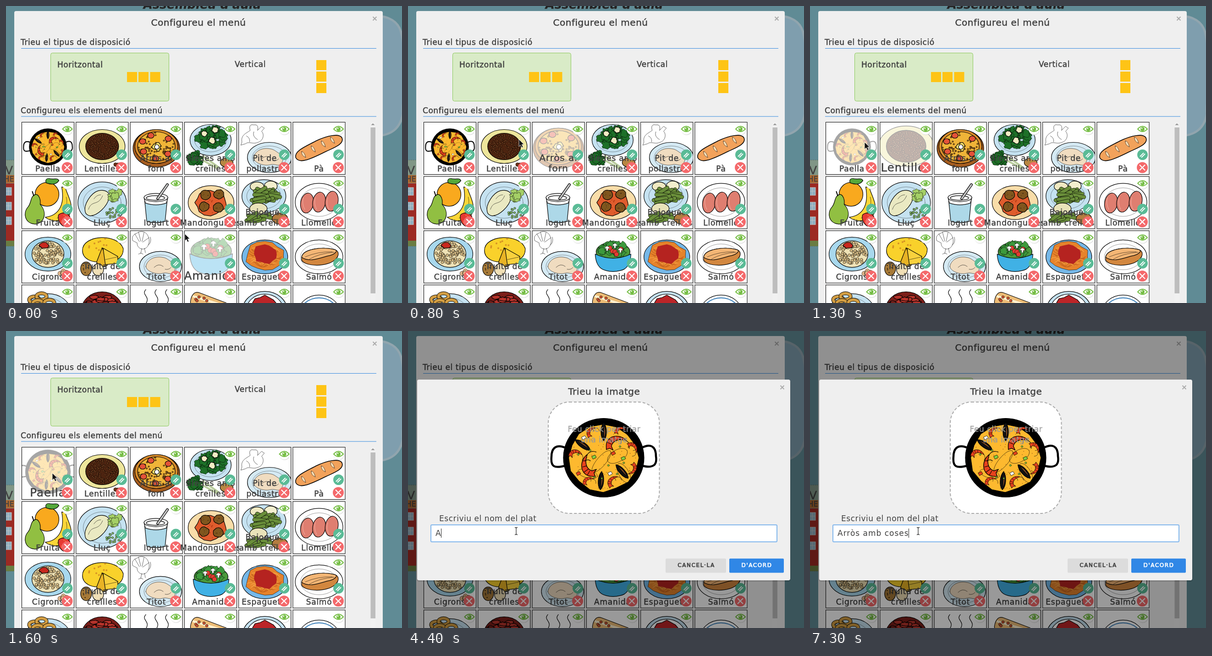
An HTML page for the animation above (8 s loop, 864 by 648 pixels).

```html
<!DOCTYPE html>
<html lang="ca">
<head>
<meta charset="utf-8">
<style>
html, body { margin: 0; width: 100%; height: 100%; overflow: hidden; background: #608b95; }
body > svg { display: block; width: 864px; height: 648px; }
text { font-family: "DejaVu Sans", sans-serif; letter-spacing: .55px; fill: #404040; stroke: #404040; stroke-width: .5px; white-space: pre; }
.label text { letter-spacing: .045em; }
.mid { text-anchor: middle; }
.thin { stroke: none; }
.button { font-size: 12px; letter-spacing: 1.6px; text-anchor: middle; stroke-width: .7px; }
.art { stroke: #000; stroke-width: 1.2; stroke-linejoin: round; stroke-linecap: round; }
.none { stroke: none; }
</style>
</head>
<body>
<script>
const BLUE = '#c5e2f1', ICE = '#d5eaf4', PALE = '#f0dcc0';
let seed = 77;
const rnd = () => (seed = seed * 16807 % 2147483647) / 2147483647;

const rect = (x, y, w, h, fill, more = '') => `<rect x="${x}" y="${y}" width="${w}" height="${h}" fill="${fill}" ${more}/>`;
const oval = (x, y, rx, ry, fill, more = '') => `<ellipse cx="${x}" cy="${y}" rx="${rx}" ry="${ry}" fill="${fill}" ${more}/>`;
const path = (d, fill = 'none', more = '') => `<path d="${d}" fill="${fill}" ${more}/>`;
const text = (x, y, s, size = 17, more = '') => `<text x="${x}" y="${y}" font-size="${size}" ${more}>${s}</text>`;
const group = (transform, body, more = '') => `<g transform="${transform}" ${more}>${body}</g>`;
const thin = 'stroke-width=".6"', bare = 'class="none"';

function blob(x, y, rx, ry, fill, wobble = .3, more = '') {
  const points = Array.from({ length: 16 }, (_, i) => {
    const a = i * Math.PI / 8, r = 1 - wobble * rnd();
    return (x + rx * r * Math.cos(a)).toFixed(1) + ',' + (y + ry * r * Math.sin(a)).toFixed(1);
  });
  return `<polygon points="${points.join(' ')}" fill="${fill}" ${more}/>`;
}
function scatter(n, x, y, rx, ry, draw) {
  let out = '';
  for (let i = 0; i < n; i++) {
    const a = rnd() * 2 * Math.PI, r = Math.sqrt(rnd());
    out += draw(x + rx * r * Math.cos(a), y + ry * r * Math.sin(a), rnd());
  }
  return out;
}
const dots = (n, x, y, rx, ry, r, fill, more = thin) => scatter(n, x, y, rx, ry, (px, py) => oval(px.toFixed(1), py.toFixed(1), r, r, fill, more));

function paella() {
  const mussel = (x, y, rot) => group(`translate(${x} ${y}) rotate(${rot})`,
    path('M0,-20 C8,-10 8,12 0,20 C-8,12 -8,-10 0,-20Z', '#111') + path('M1,-13 C4,-6 4,8 1,13Z', '#a9622f', thin));
  const shrimp = (x, y, rot, s) => group(`translate(${x} ${y}) rotate(${rot}) scale(${s})`,
    path('M-14,8 C-18,-10 4,-17 16,-7 C6,-8 -5,-5 -6,6 L-2,12 L-8,10 L-13,13Z', '#e6421d', 'stroke-width="1"')
    + path('M-14,1 l7,2 M-11,-5 l6,5 M-4,-9 l3,5 M5,-11 l1,4 M16,-7 q8,3 7,12 M6,-8 q4,4 2,8', 'none', 'stroke-width=".8"'));
  const chip = (x, y, fill) => path(`M${x},${y} l7,-3 l3,5 l-7,4Z`, fill, 'stroke-width=".8"');
  return path('M-80,-20 C-102,-31 -114,-23 -114,-2 C-116,20 -108,24 -82,17 M80,-20 C102,-33 114,-25 114,-3 C117,16 108,24 82,17', 'none', 'stroke-width="4.5"')
    + oval(0, 0, 88, 86, '#000') + blob(-1, 0, 78, 76, '#fdb92f', .06)
    + dots(60, 0, 0, 70, 68, .7, '#7a3d10', bare)
    + [[30, -4, 24, 13, -30], [-5, 8, 30, 10, -50], [44, 34, 24, 11, 60], [-35, 35, 22, 9, 15]].map(([x, y, a, b, r]) =>
        oval(x, y, a, b, 'none', `transform="rotate(${r} ${x} ${y})" stroke-width=".6"`)).join('')
    + [[0, -57, 0], [-46, -28, -55], [40, 30, -42], [-6, 50, 4]].map(m => mussel(...m)).join('')
    + [[-32, 18, -75, 1.45], [26, -32, 10, 1.35], [63, -22, 80, .8], [-62, -8, 30, .85], [-34, 51, 5, .75], [20, 52, -20, .85],
       [62, 24, 150, .8], [36, -59, 20, .75], [-27, -56, -20, .75]].map(s => shrimp(...s)).join('')
    + chip(-26, -3, '#85cf3f') + chip(38, 0, '#85cf3f') + chip(16, -11, '#e6421d') + chip(-48, -45, '#fff')
    + chip(9, 33, '#fff') + chip(-60, 33, '#e6421d') + dots(8, 0, 0, 60, 60, 2, '#85cf3f');
}

const plate = (x, y, rx, ry, fill) => oval(x, y, rx, ry, fill) + oval(x, y, rx * .78, ry * .76, 'none', 'stroke-width=".4"');
const breast = (x, y) => group(`translate(${x} ${y})`,
  path('M-32,2 C-29,-14 -12,-21 4,-18 C14,-17 18,-11 26,-7 C36,0 33,9 27,17 C20,20 14,14 4,17 C-8,20 -30,14 -32,2Z', PALE, thin) + path('M-14,4 q10,-10 20,-2 M10,8 q8,2 13,-4', 'none', thin));
const beans = (n, x, y, rx, ry) => scatter(n, x, y, rx, ry, (px, py, k) =>
  group(`translate(${px} ${py}) rotate(${k * 80 - 50})`, rect(-15, -4, 30, 8, '#6a8f3a', 'rx="4" stroke-width=".7"')));
const leaves = (n, x, y, rx, ry, fill) => scatter(n, x, y, rx, ry, (px, py) => blob(px, py, 11, 10, fill, .45, thin));

const foods = [
  ['Paella', group('translate(57 54) scale(.466)', paella())],
  ['Lentilles', oval(57, 53, 50, 37, '#eee69c') + oval(57, 53, 36, 29, '#4d2410') + dots(150, 57, 53, 33, 26, 1.7, '#874a25') + dots(5, 89, 93, 9, 3, 4, '#6a3018')],
  ['Arròs al|forn', oval(57, 57, 51, 41, '#a55d20') + oval(57, 53, 47, 37, '#d78b2b') + oval(57, 53, 41, 32, '#efb438') + dots(70, 57, 53, 40, 31, 1.6, '#9e6420')
    + [[29, 64], [45, 29], [83, 36], [82, 69], [27, 42], [55, 79]].map(([x, y]) => oval(x, y, 7, 6, '#e35238')).join('') + blob(58, 54, 12, 11, '#f8e16c', .5) + oval(58, 54, 5, 5, '#fff')],
  ['Bledes amb|creïlles', plate(57, 39, 45, 34, BLUE) + leaves(32, 57, 32, 30, 21, '#1d7028') + [[43, 25], [67, 17], [60, 40]].map(([x, y]) => blob(x, y, 8, 8, '#f2edc4')).join('')
    + leaves(16, 24, 82, 14, 14, '#1d6d26') + path('M40,74 L74,98 M38,82 L70,100', 'none', 'stroke="#b9cc9c" stroke-width="4"') + oval(92, 88, 14, 10, '#b98742')],
  ['Pit de|pollastre', path('M7,43 C4,28 17,24 25,18 C22,8 26,4 33,6 C42,4 43,12 41,18 L50,9 L56,13 L50,20 C57,27 53,41 42,44 C31,49 22,41 15,47 L5,50Z', '#fff', thin)
    + path('M17,30 q8,4 7,13 M33,21 q-4,10 8,17', 'none', thin) + plate(67, 77, 48, 33, ICE) + breast(64, 76)],
  ['Pà', path('M6,77 C3,62 30,52 50,41 C75,29 101,24 107,34 C113,47 91,55 72,64 C45,77 14,94 6,77Z', '#f2a25b', 'stroke-width="1.6"')
    + [[19, 64], [40, 52], [62, 41], [82, 33]].map(([x, y]) => path(`M${x},${y} q6,0 9,13 q-10,-4 -9,-13Z`, '#f8ddb5', thin)).join('')],
  ['Fruita', oval(55, 39, 26, 26, '#f9a91e') + path('M53,14 C50,6 56,3 62,5 C72,7 77,2 81,9 C74,20 61,17 53,14Z', '#55a83b')
    + path('M87,23 L95,24 C98,38 112,58 107,78 C95,101 65,100 51,89 C78,86 95,65 87,23Z', '#fcd637') + path('M97,45 Q104,72 77,91', 'none', thin)
    + path('M24,43 C34,32 42,47 40,61 C56,78 50,102 29,104 C7,103 1,80 14,66 C20,58 19,49 24,43Z', '#91bf42') + path('M26,42 l-3,-9', 'none', 'stroke-width="2"')
    + path('M80,84 C89,75 107,82 105,91 C104,102 94,109 90,108 C82,103 78,93 80,84Z', '#e73932') + dots(14, 93, 93, 10, 10, .8, '#ffd45c', bare)],
  ['Lluç', plate(57, 57, 53, 45, BLUE) + path('M20,77 C16,62 32,36 49,31 C64,28 75,34 72,47 C68,66 46,86 31,86 C25,85 21,82 20,77Z', '#eae9c2') + path('M27,72 C34,50 48,66 58,42 M39,49 q6,-9 15,-9', 'none', thin)
    + leaves(7, 86, 40, 10, 12, '#a4cf66') + dots(18, 80, 79, 17, 12, 2.2, '#8ac16c')],
  ['Iogurt', path('M31,48 L36,98 Q56,104 76,98 L81,48Z', '#add8e8') + path('M30,46 l3,12 q23,8 46,0 l3,-12Z', '#fff') + oval(56, 46, 26, 9, '#f1f1f1') + oval(55, 47, 20, 5, '#fff')
    + path('M60,48 L81,18', 'none', 'stroke-width="6"') + path('M60,48 L81,18', 'none', 'stroke="#c6c6c6" stroke-width="3.5"')],
  ['Mandonguilles', oval(58, 57, 50, 37, '#f9dda9') + blob(57, 57, 38, 30, '#df5c2d', .2) + dots(16, 57, 57, 30, 23, 1.2, '#b83c17', bare)
    + [[46, 40], [75, 39], [43, 66], [74, 68]].map(([x, y]) => blob(x, y, 12, 11, '#80561e', .15) + dots(5, x, y, 8, 7, .7, '#33200a', bare)).join('')],
  ['Bajoques|amb creïlles', plate(55, 43, 48, 36, BLUE) + oval(40, 22, 15, 10, '#efe9c2') + oval(70, 21, 14, 11, '#f3efce') + beans(24, 55, 44, 25, 14)
    + oval(43, 70, 19, 12, '#e9e3b9') + beans(8, 45, 91, 19, 8) + oval(90, 92, 17, 12, '#b47d40')],
  ['Llomello', plate(57, 56, 52, 41, '#fff') + [31, 57, 84].map((x, i) => oval(x, 58 - i * 2, 14, 22, '#df7e70', `transform="rotate(10 ${x} 57)"`) + path(`M${x - 8},46 q-4,14 3,26`, 'none', 'stroke="#f0a89c"')).join('')],
  ['Cigrons', oval(57, 51, 50, 37, '#a8d8ed') + oval(57, 51, 35, 29, '#efe2b6') + dots(75, 57, 51, 31, 25, 3, '#d5bb85') + blob(49, 32, 12, 7, '#c8281e') + dots(6, 92, 93, 9, 5, 5, '#e1b68a')],
  ['Truita de|creïlles', path('M14,43 C14,8 92,5 103,39 C104,60 85,71 56,67 C34,71 14,61 14,43Z', '#f9d12b') + dots(10, 57, 30, 34, 13, 2, '#d69324', bare)
    + path('M45,68 L57,37 L68,63 L68,76 L45,80Z', '#e8b325') + path('M59,38 L91,56 L91,71 L64,74Z', '#f8d13d') + path('M64,63 L91,57', 'none', thin)
    + oval(22, 83, 12, 15, '#a77a38') + oval(48, 85, 12, 13, '#f0dfb6') + dots(7, 22, 83, 9, 11, .8, '#4b310c')],
  ['Titot', path('M5,21 C2,11 10,7 15,5 C23,-1 34,2 38,10 C43,19 42,27 38,34 C29,46 14,38 15,27Z', '#fff', thin) + path('M10,7 L20,24 M18,3 L23,23 M30,4 L26,23 M41,15 L27,25 M39,31 q8,-4 5,-17 M25,39 l-2,10 m0,0 l-5,2 m5,-2 l5,2 M31,38 l2,10', 'none', thin) + plate(66, 78, 46, 33, ICE) + breast(66, 76)],
  ['Amanida', oval(58, 46, 37, 21, '#4b9a3c') + leaves(24, 58, 40, 29, 11, '#3d993d') + dots(5, 58, 42, 25, 10, 5, '#e23d30')
    + [[45, 39], [62, 33], [74, 43]].map(([x, y]) => path(`M${x - 6},${y} q6,-11 12,0 h-4 v5 h-4 v-5Z`, '#fff', thin)).join('') + path('M19,51 Q58,69 97,51 C96,73 87,85 73,87 Q58,91 43,87 C28,84 20,72 19,51Z', '#40b1e5')],
  ['Espaguetis', oval(57, 57, 50, 37, '#75b8e8') + blob(57, 55, 45, 33, '#e6832b', .15, thin) + scatter(60, 57, 55, 30, 22, (x, y, k) => path(`M${x - 10},${y} q8,${k * 30 - 15} 20,3`, 'none', `stroke="${k < .5 ? '#f7a445' : '#c4621c'}"`)) + blob(57, 51, 28, 24, '#b52320', .25, bare)],
  ['Salmó', plate(57, 57, 52, 37, '#fff') + path('M19,58 C21,40 64,34 91,41 C101,44 101,54 94,61 C77,81 24,78 19,64Z', '#d2873f') + path('M19,58 C21,40 64,34 91,41 C101,44 89,53 76,55 C55,61 35,69 19,58Z', '#f4b675') + path('M27,57 Q55,45 86,46 M36,62 Q58,49 90,47', 'none', thin)],
  ['', plate(57, 58, 49, 39, BLUE) + [[27, 32], [43, 25], [35, 40], [60, 39]].map(([x, y]) => oval(x, y, 11, 7, 'none', 'stroke-width="8"') + oval(x, y, 11, 7, 'none', 'stroke="#d39e43" stroke-width="6"')).join('')],
  ['', oval(57, 55, 45, 40, '#7c1e19') + scatter(22, 55, 38, 37, 20, (x, y) => blob(x, y, 11, 5, '#b5332b'))],
  ['', [34, 57, 80].map(x => path(`M${x},10 c-11,12 11,14 0,31`)).join('')],
  ['', path('M13,36 C15,21 22,13 33,17 L91,39 L82,60 L14,50Z', '#edbd77') + path('M20,25 L80,43', 'none', 'stroke="#fff1cf" stroke-width="5"') + dots(5, 40, 33, 20, 8, 3, '#ce5634')],
  ['', oval(57, 56, 49, 42, BLUE) + oval(57, 54, 40, 34, '#fff') + blob(57, 48, 32, 27, '#bc2528')],
  ['', oval(57, 62, 46, 40, '#fff') + oval(57, 64, 42, 36, 'none', 'stroke="#397eb8" stroke-width="2"')]
];

const eye = oval(100, 16, 12, 12, '#d5d5d5') + oval(99.5, 15, 12, 12, '#fff')
  + path('M89,15 Q99.5,3 110,15 Q99.5,26 89,15Z', '#fff', 'stroke="#74bd43" stroke-width="2"') + oval(99.5, 15, 4.5, 4.5, '#74bd43') + oval(98, 13.5, 1.3, 1.3, '#fff');
const pencil = oval(99.5, 71, 11.5, 11.5, '#5abb96') + path('M94,75 L102,67 M97,77 L105,69', 'none', 'stroke="#fff" stroke-width="2"');
const remove = oval(99, 99, 12, 12, '#f4696b') + path('M93,93 l12,12 m0,-12 l-12,12', 'none', 'stroke="#fff" stroke-width="2.2"');

function cell([name, art], i) {
  const lines = name.split('|');
  const labels = lines.map((s, k) => `<text class="mid" x="57" y="${107 - 23 * (lines.length - 1 - k)}">${s}</text>`).join('');
  return group(`translate(${34.5 + i % 6 * 118.3} ${253.5 + (i / 6 | 0) * 118.4})`,
    rect(0, 0, 114, 114, '#fff', 'stroke="#000"') + `<svg width="114" height="114"><g class="art" id="art${i}">${art}</g></svg>`
    + `<g class="label" id="label${i}" font-size="17">${labels}</g>` + eye + pencil + remove);
}
const cross = (x, y) => path(`M${x - 4},${y - 4} l8,8 m0,-8 l-8,8`, 'none', 'stroke="#aaa" stroke-width="2"');
const square = (x, y) => rect(x, y, 22, 22, '#fec416');

const backdrop = rect(0, 0, 864, 648, '#608b95')
  + path('M800,22 C835,20 858,34 863,62 C872,95 866,130 875,160 C878,195 862,205 866,235 C860,268 840,284 800,284Z', '#7f9eae', 'stroke="#91a5ae" stroke-width="5"')
  + rect(-5, 336, 30, 188, '#809686', 'stroke="#52665f" stroke-dasharray="2 2"') + text(-2, 367, 'V', 25)
  + rect(0, 369, 18, 17, '#ac672f') + text(-4, 383, 'HE', 15) + rect(0, 387, 18, 125, '#9c2a23') + rect(0, 512, 18, 12, '#6a7d43')
  + [396, 428, 460].map(y => rect(-2, y, 14, 17, '#8eafc0', 'stroke="#c4c4c4"') + path(`M5,${y} v17 M0,${y + 8} h12`, 'none', 'stroke="#c4c4c4"')).join('')
  + text(428, 6, "Assemblea d'aula", 26, 'class="mid" font-weight="bold" font-style="italic" style="letter-spacing:0;fill:#222"');

const panel = rect(18, 11, 804, 660, '#efefef', 'rx="4"') + text(420, 43, 'Configureu el menú', 20, 'class="mid"') + cross(804.5, 27.5)
  + text(32, 85, 'Trieu el tipus de disposició') + rect(33, 92, 775, 1, '#348ae0')
  + rect(97.5, 102.5, 258, 105, '#d9ebc7', 'rx="4" stroke="#8bc85b"') + text(112, 134, 'Horitzontal') + text(499, 133, 'Vertical')
  + square(264, 144) + square(289, 144) + square(314.5, 144) + square(677, 118) + square(677, 143) + square(677, 168)
  + text(32, 234, 'Configureu els elements del menú') + rect(33, 240.5, 775, 1, '#348ae0')
  + rect(795, 253, 11, 395, '#f1f1f1') + path('M796.5,260 l4,-4 l4,4Z', '#999') + rect(795.5, 265, 10.5, 362, '#bdbdbd')
  + foods.map(cell).join('');

const dialog = rect(0, 0, 864, 648, '#000', 'opacity=".4"') + rect(19, 107, 816, 440, '#000', 'rx="5" opacity=".12"') + rect(20, 106, 814, 438, '#efefef', 'rx="4"')
  + text(428, 139, 'Trieu la imatge', 20, 'class="mid"') + cross(816.5, 123)
  + rect(306, 155, 242.5, 243, '#fff', 'rx="46" stroke="#aaa" stroke-width="2" stroke-dasharray="6 4"')
  + group('translate(427 276.5)', paella(), 'class="art"')
  + ['Feu click per triar', 'una imatge'].map((s, i) => text(428, 220 + i * 23, s, 17, 'class="mid" style="fill:#999;stroke:#999;opacity:.88"')).join('')
  + text(68, 415, 'Escriviu el nom del plat', 17, 'class="thin"')
  + rect(50, 423, 755, 37, '#fff', 'rx="2" stroke="#83b7ec" stroke-width="2"')
  + text(60, 447, '', 17, 'id="typed" class="thin" style="letter-spacing:1px"') + rect(0, 431, 1, 20, '#222', 'id="caret"')
  + rect(562, 496.5, 132, 31, '#dcdcdc', 'rx="2"') + text(629, 515, 'CANCEL·LA', 12, 'class="button"')
  + rect(701, 496.5, 119, 31, '#3087e6', 'rx="2"') + text(761, 515, "D'ACORD", 12, 'class="button" style="fill:#fff;stroke:#fff"')
  + path('M233,428.5 q3,0 3,2 q0,-2 3,-2 M236,430 v13 M233,444.5 q3,0 3,-2 q0,2 3,2', 'none', 'stroke="#333" stroke-width="1.3"');

const pointer = path('M0,0 V15.5 L3.6,12.2 L6.2,18 L9,16.8 L6.5,11 H11.2Z', '#111', 'id="arrow" stroke="#fff" stroke-width=".8"')
  + path('M-1,1 Q1,-2 3,1 L5,7 V5 Q8,3 8,6 Q11,4 12,8 Q14,9 14,12 L13,21 H4 L-5,11 Q-4,8 0,11Z', '#444', 'id="hand" stroke="#222"');

document.body.innerHTML = `<svg viewBox="0 0 864 648">${backdrop}${panel}<g id="pointer">${pointer}</g><g id="dialog">${dialog}</g></svg>`;

const $ = id => document.getElementById(id);
const hovers = [[15, -1000, 500], [8, 500, 700], [2, 700, 900], [1, 900, 1400], [0, 1300, 4400]];   // cell, from, to
const track = [[400, 390, 497], [800, 242, 291], [1100, 155, 289], [1300, 119, 297], [1600, 101, 310], [1800, 101, 310], [2200, 138, 321]];
const phrase = 'Arròs amb coses';
const typing = [[4400, 1], [4800, 3], [5700, 5], [6000, 6], [6200, 9], [6300, 10], [6500, 11], [6700, 13], [6900, 14], [7300, 15]];

function position(t) {
  const next = track.findIndex(k => k[0] > t);
  if (next === 0) return track[0].slice(1);
  if (next < 0) return track.at(-1).slice(1);
  const [t0, x0, y0] = track[next - 1], [t1, x1, y1] = track[next], k = (t - t0) / (t1 - t0);
  return [x0 + (x1 - x0) * k, y0 + (y1 - y0) * k];
}

function draw(now) {
  const t = Math.floor(now % 8000 / 100) * 100;
  for (const [i, from, to] of hovers) {
    const on = t >= from && t < to, grow = on ? Math.min(1, (t - from) / 250) : 0;
    $('art' + i).setAttribute('opacity', on ? .35 : 1);
    $('art' + i).setAttribute('transform', `translate(57 55) scale(${1 + .2 * grow}) translate(-57 -55)`);
    $('label' + i).setAttribute('font-size', 17 * (1 + .43 * grow));
  }
  const open = t >= 4400;
  $('pointer').style.display = open ? 'none' : '';
  $('dialog').style.display = open ? '' : 'none';
  $('pointer').setAttribute('transform', `translate(${position(t)})`);
  $('arrow').style.display = t < 2100 ? '' : 'none';
  $('hand').style.display = t < 2100 ? 'none' : '';
  if (open) {
    $('typed').textContent = phrase.slice(0, typing.findLast(k => k[0] <= t)[1]);
    $('caret').setAttribute('x', Math.round(59 + $('typed').getComputedTextLength()));
    $('caret').style.display = t >= 5300 && t < 5700 ? 'none' : '';
  }
  requestAnimationFrame(draw);
}
requestAnimationFrame(draw);
</script>
</body>
</html>
```
